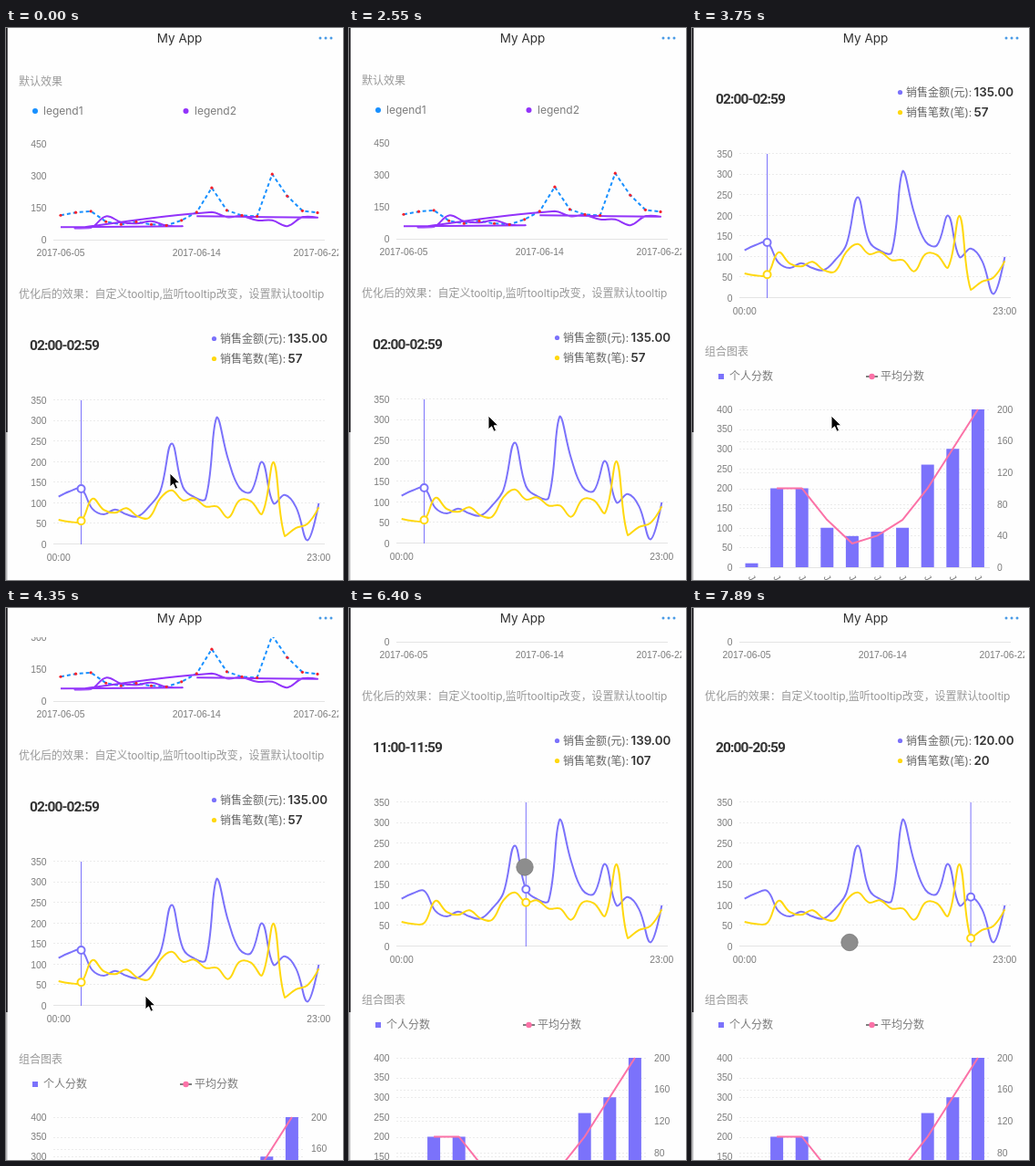
Animation of 370x605 px, one loop 8000 ms. Source, as an HTML page:

```html
<!DOCTYPE html>
<html lang="zh-CN">
<head>
<meta charset="utf-8">
<title>My App</title>
<style>
  html, body { margin: 0; width: 100%; height: 100%; overflow: hidden; background: #fefefe; }
  svg { display: block; }
  text { font: 12px Inter, "Noto Sans CJK SC", "Noto Sans CJK", sans-serif; fill: #666; }
  .axis { font: 10.4px "Liberation Sans", sans-serif; fill: #7c7c7c; }
  .title { fill: #999; }
  .note { fill: #999; letter-spacing: -.06px; }
  .legend { fill: #7c7c7c; }
  .value { font-size: 13.4px; font-weight: 600; fill: #333; }
  .range { font: 600 15.5px Roboto, sans-serif; letter-spacing: -.9px; fill: #333; }
  .head { font-size: 13.5px; fill: #333; }
</style>
</head>
<body>
<svg id="stage" width="370" height="605" viewBox="0 0 370 605">
  <defs><clipPath id="page"><rect x="0" y="32" width="365" height="573"/></clipPath></defs>
</svg>
<script>
const VIOLET = '#7b72fb', YELLOW = '#ffd80f', PINK = '#fb72a7', PURPLE = '#9233fa', BLUE = '#1890ff';
const LOOP = 8000;
const sales = [116, 129, 135, 86, 73, 85, 73, 68, 92, 130, 245, 139, 115, 111, 309, 206, 137, 128, 200, 100, 120, 90, 10, 100];
const counts = [60, 55, 57, 111, 84, 77, 88, 68, 65, 112, 131, 107, 112, 92, 92, 65, 107, 105, 75, 200, 20, 40, 50, 90];
const scores = [10, 200, 200, 100, 79, 90, 100, 260, 300, 400];
const means = [100, 100, 60, 30, 40, 60, 100, 150, 200];

const stage = document.getElementById('stage');

function add(parent, tag, attrs, text) {
  const node = document.createElementNS('http://www.w3.org/2000/svg', tag);
  set(node, attrs);
  if (text !== undefined) node.textContent = text;
  return parent.appendChild(node);
}
function set(node, attrs) {
  for (const key in attrs) node.setAttribute(key, attrs[key]);
}
const label = (parent, x, y, text, cls = '', anchor = 'start') =>
  add(parent, 'text', { x, y, class: cls, 'text-anchor': anchor }, text);
const dot = (parent, cx, cy, r, fill) => add(parent, 'circle', { cx, cy, r, fill });
const stroke = (parent, d, color, width, more) =>
  add(parent, 'path', { d, fill: 'none', stroke: color, 'stroke-width': width, 'stroke-linejoin': 'round', ...more });
const hline = (parent, x1, x2, y, dashed) =>
  stroke(parent, `M${x1} ${y}H${x2}`, dashed ? '#ebebeb' : '#e4e4e4', 1, dashed ? { 'stroke-dasharray': '2 2' } : {});
const poly = pts => 'M' + pts.map(p => p.join(' ')).join('L');

// Bezier smoothing with control points kept inside the data's bounds.
function smooth(pts) {
  const bounds = [0, 1].map(k => [Math.min(...pts.map(p => p[k])), Math.max(...pts.map(p => p[k]))]);
  const controls = pts.map((p, i) => {
    const a = pts[i - 1], b = pts[i + 1];
    if (!a || !b) return [p, p];
    const da = Math.hypot(p[0] - a[0], p[1] - a[1]), db = Math.hypot(p[0] - b[0], p[1] - b[1]);
    return [-da, db].map(d => [0, 1].map(k => {
      const c = p[k] + (b[k] - a[k]) * 0.4 * d / (da + db);
      return Math.max(bounds[k][0], Math.min(bounds[k][1], c));
    }));
  });
  let d = 'M' + pts[0].join(' ');
  for (let i = 1; i < pts.length; i++) d += `C${controls[i - 1][1]} ${controls[i][0]} ${pts[i]}`;
  return d;
}

const view = add(stage, 'g', { 'clip-path': 'url(#page)' });
const page = add(view, 'g', {});

// First chart
label(page, 14, 63, '默认效果', 'title');
dot(page, 32, 91, 3, BLUE);
label(page, 41, 95, 'legend1', 'legend');
dot(page, 197.5, 91, 3, PURPLE);
label(page, 207, 95, 'legend2', 'legend');
for (let v = 0; v <= 450; v += 150) label(page, 44.5, 236 - v * 0.2333, v, 'axis', 'end');
hline(page, 52, 350, 232.5);
const dayX = i => 60 + i * 16.59, dayY = v => 232.3 - v * 0.2333;
[[0, '05'], [9, '14'], [17, '22']].forEach(([i, day]) => label(page, dayX(i), 250, '2017-06-' + day, 'axis', 'middle'));
const days = [...Array(18).keys()];
const order = [9, ...days.slice(10).reverse(), ...days.slice(1, 9), 0];
const daily = days.map(i => [dayX(i), dayY(sales[i])]);
stroke(page, poly(daily), BLUE, 2, { 'stroke-dasharray': '4 3' });
stroke(page, smooth(order.map(i => [dayX(i), dayY(counts[i])])), PURPLE, 2);
daily.forEach(([x, y]) => dot(page, x, y, 1.6, '#f5222d'));

// Second chart
label(page, 14, 296, '优化后的效果：自定义tooltip,监听tooltip改变，设置默认tooltip', 'note');
const range = label(page, 26, 353, '', 'range');
const rows = [['销售金额(元):', VIOLET], ['销售笔数(笔):', YELLOW]].map(([name, color], i) => {
  dot(page, 228.5, 340.5 + 22 * i, 2.6, color);
  label(page, 235, 345 + 22 * i, name);
  return label(page, 309.5, 345 + 22 * i, '', 'value');
});
const hourX = h => 57.7 + h * 12.42, hourY = v => 566 - v * 0.4514;
for (let v = 0; v <= 350; v += 50) {
  hline(page, 52, 350, Math.round(hourY(v)) - 0.5, v > 0);
  label(page, 44.5, hourY(v) + 3.8, v, 'axis', 'end');
}
label(page, hourX(0), 583.5, '00:00', 'axis', 'middle');
label(page, hourX(23), 583.5, '23:00', 'axis', 'middle');
[[sales, VIOLET], [counts, YELLOW]].forEach(([data, color]) =>
  stroke(page, smooth(data.map((v, h) => [hourX(h), hourY(v)])), color, 2));
const guide = stroke(page, 'M0 408V566', VIOLET, 1);
const marks = [VIOLET, YELLOW].map(color => add(page, 'circle', { r: 4, fill: '#fff', stroke: color, 'stroke-width': 2 }));

// Third chart
label(page, 14, 629, '组合图表', 'title');
add(page, 'rect', { x: 29, y: 649, width: 6, height: 6, fill: VIOLET });
label(page, 41, 656, '个人分数', 'legend');
stroke(page, 'M191 652H204', '#555', 1.5);
dot(page, 197.5, 652, 3.2, PINK);
label(page, 207, 656, '平均分数', 'legend');
const scoreX = i => 65.5 + i * 27.6, scoreY = v => 861 - v * 0.4325;
for (let v = 0; v <= 400; v += 50) {
  hline(page, 52, 327, Math.round(scoreY(v)) + 0.5, v > 0);
  label(page, 44.5, scoreY(v) + 3.8, v, 'axis', 'end');
}
for (let v = 0; v <= 200; v += 40) {
  if (v % 200) hline(page, 52, 327, Math.round(scoreY(v * 2)) + 0.5, true);
  label(page, 335, scoreY(v * 2) + 3.8, v, 'axis');
}
scores.forEach((v, i) => {
  const x = scoreX(i);
  add(page, 'rect', { x: x - 7, y: scoreY(v), width: 14, height: 861 - scoreY(v), fill: VIOLET });
  add(page, 'text', { class: 'axis', transform: `translate(${x - 4} 872) rotate(60)` }, 'Joy');
});
stroke(page, poly(means.map((v, i) => [scoreX(i + 1), scoreY(v * 2)])), PINK, 2);

// Window edge and header
add(stage, 'rect', { width: 1.7, height: 443, fill: '#1d1c20' });
add(stage, 'rect', { y: 443, width: 1.5, height: 162, fill: '#b9b9bb' });
label(stage, 190.5, 16, 'My App', 'head', 'middle');
[345, 351, 357].forEach(x => dot(stage, x, 11, 1.5, '#4a9be6'));

// Pointer
const arrow = add(stage, 'path', {
  d: 'M0 0V15L3.6 11.8L6 17.3L8.6 16.2L6.2 10.8H11Z',
  fill: '#000', stroke: '#fff', 'stroke-width': 1, 'stroke-linejoin': 'round'
});
const touch = add(stage, 'circle', { r: 9.2, fill: '#8d8d8d', stroke: '#7a7a7a', 'stroke-width': 0.8 });

// Held states: [start time, values...]
const scroll = [[0, 0], [2550, -1], [2700, -42], [2850, -142], [3000, -232], [3150, -274], [3300, -281],
  [3750, -270], [3900, -250], [4350, -130], [4500, -108], [4650, -102], [5100, -199], [5250, -197], [5400, -195]];
const pointer = [[0, 180, 488], [150, 160, 444], [300, 153, 425], [5400, 176, 350], [5550, 198, 275],
  [5670, 207.5, 243], [5960, 193, 275], [6110, 193, 284], [6850, 204, 287], [7000, 228, 293], [7150, 262, 302],
  [7300, 304, 316], [7450, 334, 328], [7600, 300, 343], [7750, 232, 358], [7890, 173, 366.5]];
const hours = [[0, 2], [6400, 11], [6850, 12], [7000, 14], [7150, 16], [7300, 19], [7450, 20]];
const held = (track, t) => track.filter(k => k[0] <= t).pop().slice(1);

function draw(t) {
  set(page, { transform: `translate(0 ${held(scroll, t)[0]})` });

  const [h] = held(hours, t), hh = String(h).padStart(2, '0');
  range.textContent = `${hh}:00-${hh}:59`;
  rows[0].textContent = sales[h].toFixed(2);
  rows[1].textContent = counts[h];
  set(guide, { transform: `translate(${hourX(h)} 0)` });
  [sales, counts].forEach((data, i) => set(marks[i], { cx: hourX(h), cy: hourY(data[h]) }));

  const [x, y] = held(pointer, t), pressed = t >= 6110;
  set(arrow, { transform: `translate(${x} ${y})`, visibility: pressed ? 'hidden' : 'visible' });
  set(touch, { cx: x, cy: y, visibility: pressed ? 'visible' : 'hidden' });
}

const start = performance.now();
function tick() {
  draw((performance.now() - start) % LOOP);
  requestAnimationFrame(tick);
}
tick();
</script>
</body>
</html>
```
